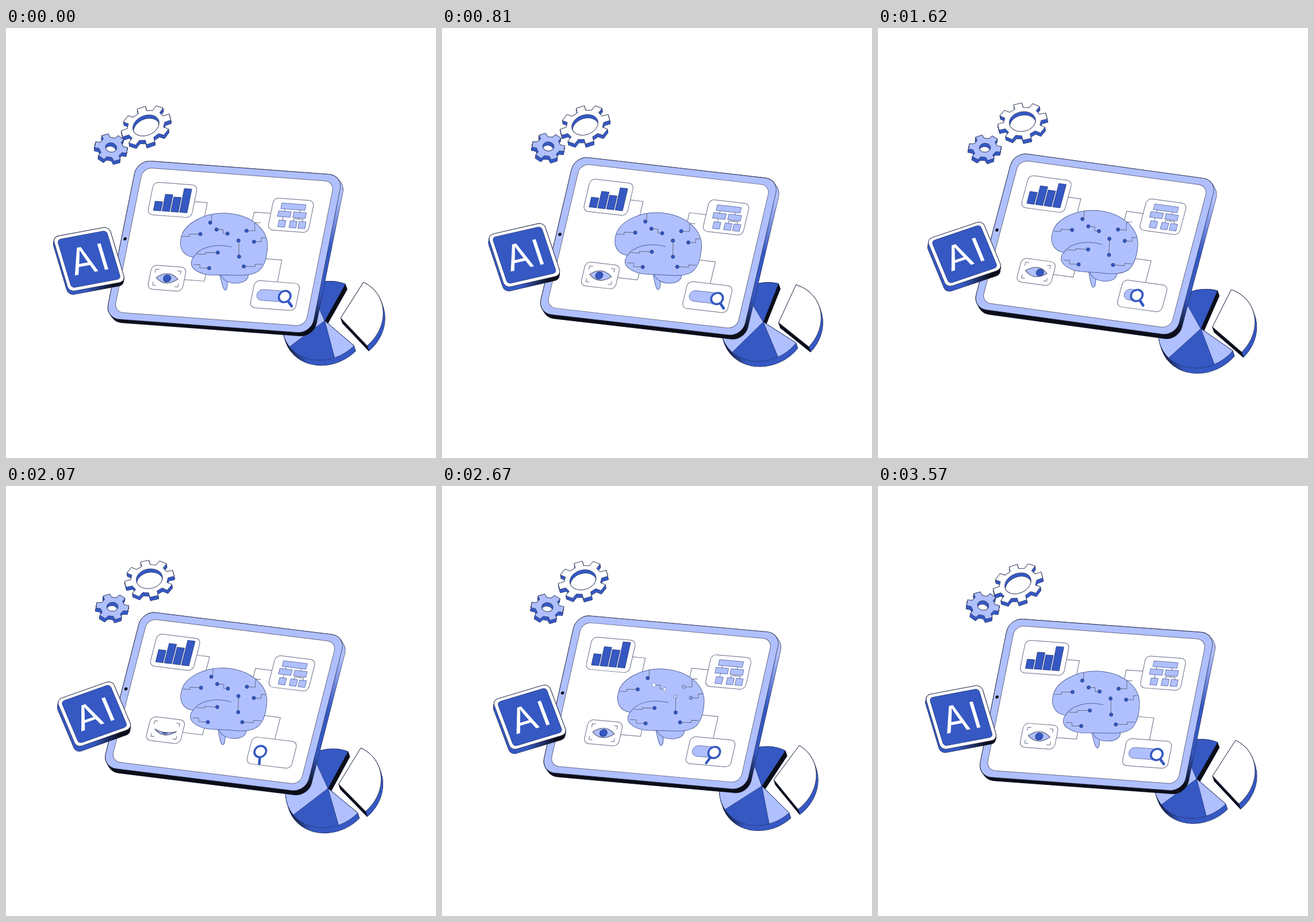
Animation, 748 px wide and 748 px high, one loop 3600 ms. Source, as an HTML page with a canvas:

```html
<!DOCTYPE html>
<html lang="en">
<head>
<meta charset="utf-8">
<title>AI tablet</title>
<style>
  html, body { margin: 0; height: 100%; overflow: hidden; background: #fff; }
  canvas { display: block; width: 100vw; height: 100vh; }
</style>
</head>
<body>
<canvas width="748" height="748"></canvas>
<script>
const ctx = document.querySelector('canvas').getContext('2d');
const LIGHT = '#b0c0ff', BLUE = '#3558c3', NAVY = '#22397f', INK = '#0b0d18';
const LINE = '#666b84', SOFT = '#53639f', EDGE = '#252b45';
const PERIOD = 3600, RAD = Math.PI / 180;

// One slow swing per loop; the peak is given in degrees of the loop.
const wave = (t, mean, amp, peak) => mean + amp * Math.cos((t * 360 / PERIOD - peak) * RAD);

function smooth(t, from, to) {
  const s = Math.min(1, Math.max(0, (t - from) / (to - from)));
  return s * s * (3 - 2 * s);
}
const hold = (t, a, b, c, d) => smooth(t, a, b) - smooth(t, c, d);
const pulse = (t, center, width) => Math.max(0, 1 - Math.abs(t - center) / width);

// Matrix that puts a w by h rectangle on its top left, top right and bottom left corners
const frame = (x, y, ux, uy, vx, vy, w, h) =>
  [(ux - x) / w, (uy - y) / w, (vx - x) / h, (vy - y) / h, x, y];

function ramp(x0, y0, x1, y1, ...stops) {
  const g = ctx.createLinearGradient(x0, y0, x1, y1);
  stops.forEach(([at, color]) => g.addColorStop(at, color));
  return g;
}

function paint(path, fill, stroke = LINE, width = 1) {
  if (fill) { ctx.fillStyle = fill; ctx.fill(path, 'evenodd'); }
  if (stroke) { ctx.strokeStyle = stroke; ctx.lineWidth = width; ctx.stroke(path); }
}

// Extruded body: outline first, then the side colour, then the face.
function solid([a, b, c, d, e, f], path, dx, dy, side, face) {
  for (const fill of [null, side])
    for (let k = 1; k >= 0; k -= .1) {
      ctx.setTransform(a, b, c, d, e + dx * k, f + dy * k);
      paint(path, fill, fill ? null : EDGE, 1.2);
    }
  ctx.setTransform(a, b, c, d, e, f);
  paint(path, face, EDGE, .7);
}

function box(x, y, w, h, r = 0) {
  const p = new Path2D();
  p.roundRect(x, y, w, h, r);
  return p;
}

function disc(x, y, r) {
  const p = new Path2D();
  p.arc(x, y, r, 0, 7);
  return p;
}

const wire = (...pts) => paint(new Path2D('M' + pts.join(' ')), null);

function gearPath(teeth, phase, root, tip, hole, baseHalf, tipHalf) {
  const p = new Path2D();
  for (let i = 0; i < teeth; i++)
    for (const [r, da] of [[root, -baseHalf], [tip, -tipHalf], [tip, tipHalf], [root, baseHalf]]) {
      const a = (phase + i * 360 / teeth + da) * RAD;
      p.lineTo(r * Math.cos(a), r * Math.sin(a));
    }
  p.closePath();
  p.moveTo(hole, 0);
  p.arc(0, 0, hole, 0, 2 * Math.PI);
  return p;
}
const bigGear = gearPath(8, -101, 32.5, 43, 23, 13, 9.5);
const smallGear = gearPath(6, -112, 21, 28.5, 10, 18, 12);

function drawGears(t) {
  const big = [1, wave(t, -.14, .06, 190), 0, wave(t, .765, .015, 20),
    wave(t, 247.1, 4.2, 150), wave(t, 165.7, 4.4, 30)];
  const small = [1, wave(t, .02, .045, 350), 0, wave(t, .81, .02, 0),
    wave(t, 184.3, 1.8, 145), wave(t, 208.4, 2.4, 255)];
  solid(big, bigGear, 1, 6, BLUE, '#fff');
  solid(small, smallGear, -1, 6, BLUE, LIGHT);
}

// Point on the tilted pie rim in a given direction
function rim(deg) {
  const a = 76, b = 66, q = (deg + 30) * RAD;
  const r = a * b / Math.hypot(b * Math.cos(q), a * Math.sin(q));
  return [r * Math.cos(deg * RAD), r * Math.sin(deg * RAD)];
}

function sector(from, to) {
  const p = new Path2D();
  p.moveTo(0, 0);
  for (let k = 0; k <= 40; k++) p.lineTo(...rim(from + (to - from) * k / 40));
  p.closePath();
  return p;
}

function cutFace(deg, dx, dy) {
  const [x, y] = rim(deg);
  paint(new Path2D(`M0 0L${x} ${y}l${dx} ${dy}L${dx} ${dy}Z`), INK, INK, .7);
}

function drawPie(t) {
  const x = wave(t, 557.7, 3.8, 155), y = wave(t, 517, 9, 210);
  const looseX = x + wave(t, 23.8, 5, 30), looseY = y + wave(t, -4.8, 6, 90);
  const cuts = [38.5, 73, 141.5, 244.5, 297.5].map(a => wave(t, a, 6.5, 288));
  const right = cuts[0], top = cuts[4], dx = 3, dy = 9;
  solid([1, 0, 0, 1, x, y], sector(right, top), dx, dy, ramp(-76, 0, -30, 0, [0, INK], [1, BLUE]), LIGHT);
  cutFace(top, dx, dy);
  for (let i = 0; i < 4; i++)
    paint(sector(cuts[i], cuts[i + 1]), i % 2 ? BLUE : LIGHT, NAVY, .7);
  const loose = sector(top - 357, right + 6);
  solid([1, 0, 0, 1, looseX, looseY], loose, dx, dy, BLUE, '#fff');
  cutFace(right + 6, dx, dy);
  paint(loose, '#fff', EDGE, .7);
}

function drawChart(t) {
  paint(box(36, 36, 76.5, 57.5, 9), '#fff');
  [66.5, 53.5, 58, 43].forEach((mean, i) => {
    const top = wave(t, mean, 3, 20 + 20 * i);
    paint(box(45 + 15.2 * i, top, 13, 85.5 - top), BLUE, NAVY, .8);
  });
}

function drawTree() {
  const node = (x, y, w, h) => paint(box(x, y, w, h), LIGHT, SOFT, .8);
  paint(box(247.5, 48, 70.5, 56.5, 9), '#fff');
  wire(270, 65, 270, 87);
  wire(297, 65, 297, 82);
  wire(289, 86, 289, 82, 305, 82, 305, 86);
  node(263, 56, 42, 10);
  for (const x of [260, 286.5]) node(x, 70, 22, 10);
  for (const x of [264, 283.5, 299]) node(x, 86, 12, 12);
}

function drawEye(t) {
  paint(box(61.5, 181, 60.5, 42.5, 9), '#fff');
  for (const sx of [-1, 1]) for (const sy of [-1, 1]) {
    const x = 91.5 + 22 * sx, y = 202 + 14 * sy;
    wire(x - 6 * sx, y, x, y, x, y - 6 * sy);
  }
  const lid = 1 - 1.47 * pulse(t, 2070, 170);
  const look = 6.5 * hold(t, 900, 1120, 1650, 1950) - 8 * hold(t, 200, 430, 650, 900);
  const eye = new Path2D(`M73 202.5Q92 ${202.5 - 17 * lid} 111 202.5Q92 219 73 202.5Z`);
  paint(eye, LIGHT);
  ctx.save();
  ctx.clip(eye);
  paint(disc(92 + look, 202.5, 6.3), BLUE, NAVY);
  ctx.restore();
  paint(eye, null);
}

function drawSearch(t) {
  const x = 300 - 37 * hold(t, 1200, 1850, 2150, 2950), y = 219;
  const angle = (46 + 70 * hold(t, 1650, 2500, 2750, 3350)) * RAD;
  const bar = Math.min(19, (x - 264) * 2.4);
  paint(box(243.5, 194.5, 79, 48, 9), '#fff');
  if (bar > 0) paint(box(251.5, y - bar / 2, x - 247, bar, bar / 2), LIGHT, SOFT, .8);
  const c = Math.cos(angle), s = Math.sin(angle);
  ctx.lineCap = 'round';
  paint(new Path2D(`M${x + 11 * c} ${y + 11 * s}L${x + 22 * c} ${y + 22 * s}`), null, BLUE, 4.5);
  ctx.lineCap = 'butt';
  paint(disc(x, y, 10), '#fff', BLUE, 3.6);
}

const stem = new Path2D('M371 428C374 438 375 448 379 454Q382 457 384 451L385 436Z');
const cerebellum = new Path2D('M373 428C376 438 387 444 402 443C413 442 421 437 421 428Z');
const cerebrum = new Path2D('M326 398C306 396 301 380 304 366C308 340 345 321 380 321.5' +
  'C427 323 457 350 454 382C453 400 449 412 441 420C430 430 410 430 390 429L356 429' +
  'C338 428 320 419 322 407C323 401 325 399 326 398Z');
const sulcus = new Path2D('M326 398C335 382 362 373 392 380');
// Dot position and how far its stepped trace runs
const TRACES = [
  [355, 338, 4, -14], [338, 358, -32, 4], [366, 350, 19, 7], [385, 357, 0, 0],
  [418, 352, 24, -14], [404, 369, 1, 28], [431, 371, 21, -7], [368, 390, -36, 3],
  [405, 397, 0, 0], [353, 417, -27, -6], [413, 414, 33, -4]];

function drawBrain(t) {
  ctx.save();
  ctx.transform(.9888, -.0712, .2012, 1.0048, -272.3, -214.8);
  for (const part of [stem, cerebellum, cerebrum]) paint(part, LIGHT, SOFT);
  paint(sulcus, null, SOFT);
  for (const [x, y, dx, dy] of TRACES)
    wire(x, y, x + .6 * dx, y, x + .6 * dx, y + dy, x + dx, y + dy);
  for (const [x, y] of TRACES) {
    const dot = disc(x, y, 3), glows = x > 360 && y < 372;
    paint(dot, BLUE, NAVY, .8);
    ctx.globalAlpha = glows ? pulse(t, 2670 + (x - 370) * 2, 200) : 0;
    paint(dot, '#fff', null);
    ctx.globalAlpha = 1;
  }
  ctx.restore();
}

function drawTablet(t) {
  const place = frame(
    wave(t, 232.6, 4.5, 195), wave(t, 223, 7, 350),
    wave(t, 588, 2.5, 215), wave(t, 260, 5.6, 130),
    wave(t, 169.3, 5, 318), wave(t, 496, 9, 350), 358, 280);
  const side = ramp(0, 0, 0, 280, [0, LIGHT], [.12, LIGHT], [.45, BLUE], [.75, BLUE], [.95, INK]);
  solid(place, box(0, 0, 358, 280, 24), 4.5, wave(t, 6.8, .9, 160), side, LIGHT);
  paint(box(12.5, 12, 333, 256, 16), '#fff');
  paint(disc(6.2, 139, 2.8), INK, null);
  wire(112, 65, 135, 65, 135, 90);
  wire(249, 75.5, 218.5, 75.5, 218.5, 92);
  wire(122, 202.5, 157, 202.5, 157, 184);
  wire(282.5, 195, 282.5, 155.5, 248, 155.5);
  drawBrain(t);
  drawChart(t);
  drawTree();
  drawEye(t);
  drawSearch(t);
}

function drawTile(t) {
  const place = frame(
    wave(t, 83.7, 4.7, 238), wave(t, 366.8, 6.7, 243),
    wave(t, 181, 4.3, 245), wave(t, 340.7, 5.8, 325),
    wave(t, 115.5, 7.6, 220), wave(t, 456, 5.4, 305), 100, 100);
  const side = ramp(0, 0, 100, 0, [0, BLUE], [.3, BLUE], [.8, INK]);
  solid(place, box(0, 0, 100, 100, 10), -1, wave(t, 7.5, 1.5, 180), side, '#fff');
  paint(box(6.3, 6, 87.4, 88, 6), BLUE, NAVY, .8);
  ctx.fillStyle = '#fff';
  ctx.font = '400 65px Inter, "Open Sans", sans-serif';
  ctx.textAlign = 'center';
  ctx.fillText('A', 39, 73.5);
  ctx.fillText('I', 74.5, 73.5);
}

function draw() {
  const t = performance.now() % PERIOD;
  ctx.resetTransform();
  ctx.clearRect(0, 0, 748, 748);
  ctx.lineJoin = 'round';
  drawGears(t);
  drawPie(t);
  drawTablet(t);
  drawTile(t);
  requestAnimationFrame(draw);
}
draw();
</script>
</body>
</html>
```
